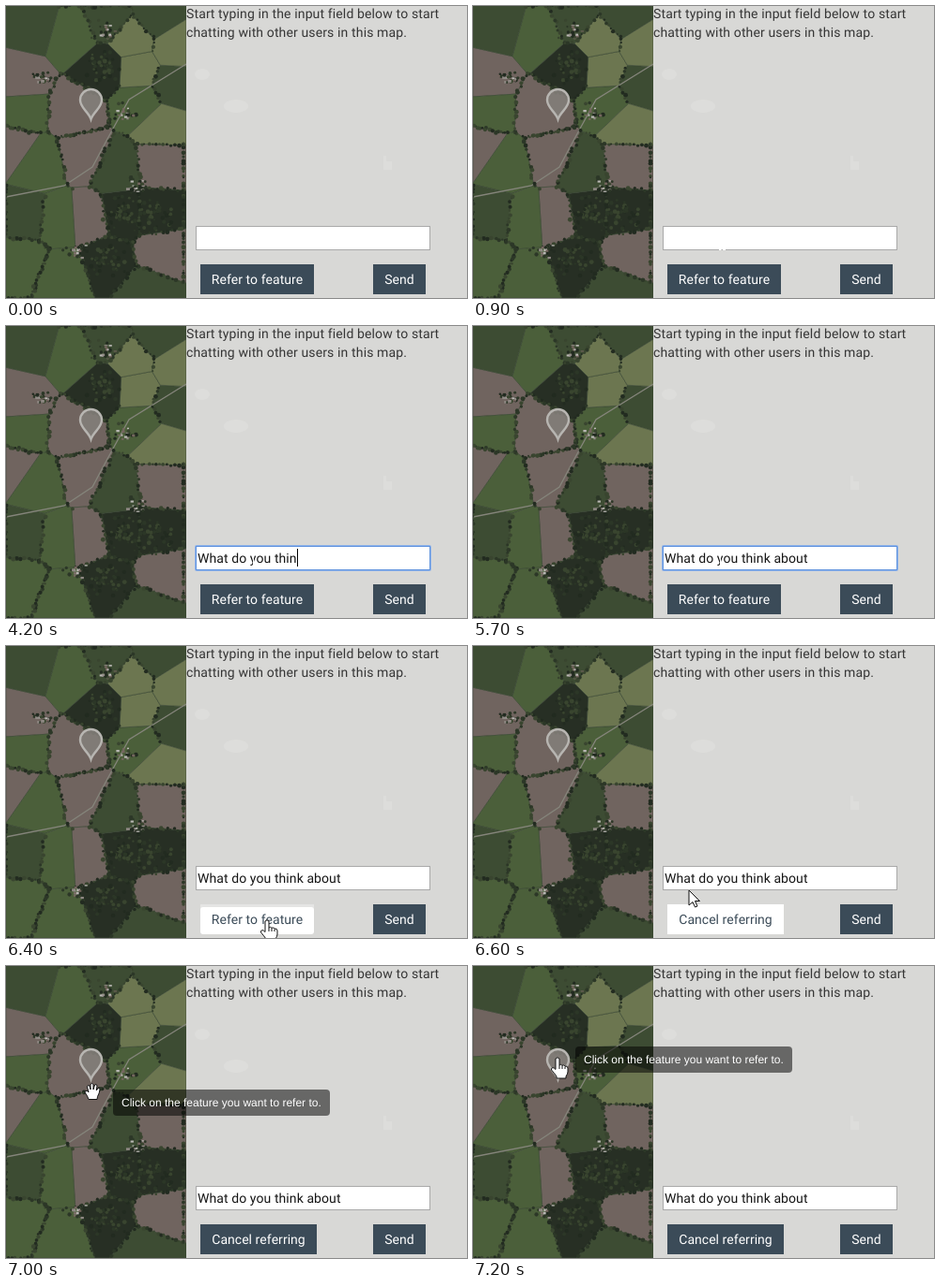
Animation, 491 px wide and 312 px high, one loop 8000 ms. Source, as an HTML page:

```html
<!DOCTYPE html>
<html lang="en">
<head>
<meta charset="utf-8">
<title>Map chat</title>
<style>
  html, body { margin: 0; width: 100%; height: 100%; overflow: hidden; background: #d8d8d6; }
  svg { display: block; width: 491px; height: 312px; }
  text { font: 14px Roboto, sans-serif; font-kerning: none; text-rendering: geometricPrecision; white-space: pre; }
  #intro text { fill: #363636; letter-spacing: .13px; }
  #typed { fill: #161616; letter-spacing: .08px; }
  .label { fill: #fff; text-anchor: middle; letter-spacing: .03px; }
  #tip text { font: 12px "Liberation Sans", Arial, sans-serif; fill: #fff; }
  #fields { stroke: #3a4632; stroke-opacity: .6; }
  #cursor path { fill: #fff; stroke: #111; stroke-linejoin: round; }
  #cursor #beam { fill: none; stroke: #fff; }
</style>
</head>
<body>
<svg viewBox="0 0 491 312">
  <g id="fields"></g>
  <path d="M192 62L131 100 108 142 92 172 62 192 0 204" fill="none" stroke="#85857b" stroke-width="1.3"/>
  <g id="specks"></g>
  <path d="M90.5 121C88 113 79 109 79 100.5A11.5 11.5 0 1 1 102 100.5C102 109 93 113 90.5 121Z" fill="#827d79" fill-opacity=".9" stroke="#b7b5b1" stroke-width="2.4"/>

  <rect x="192" width="299" height="312" fill="#d8d8d6"/>
  <g fill="#dddddb">
    <ellipse cx="245" cy="107" rx="13" ry="7"/>
    <ellipse cx="209" cy="73" rx="8" ry="6"/>
    <path d="M402 160h3v6h6v9h-9z"/>
  </g>
  <g id="intro">
    <text x="192" y="13">Start typing in the input field below to start</text>
    <text x="192" y="33">chatting with other users in this map.</text>
  </g>

  <rect id="glow" x="201.5" y="234.5" width="251" height="27" rx="1" fill="none" stroke="#8fb3ea"/>
  <rect id="box" x="202.5" y="235.5" width="249" height="25" fill="#fff"/>
  <text id="typed" x="204" y="253"></text>
  <rect id="caret" y="238" width="1" height="19"/>

  <rect id="strip" x="207" y="276" width="121" height="6" fill="#e5e5e4"/>
  <rect id="refer" x="207"/>
  <text id="referText" class="label" y="297"></text>
  <rect x="391" y="276" width="56" height="32" fill="#3b4b58"/>
  <text class="label" x="419" y="297">Send</text>

  <g id="tip">
    <rect width="231" height="28" rx="4" fill="#000" fill-opacity=".52"/>
    <text x="9" y="18">Click on the feature you want to refer to.</text>
  </g>
  <g id="cursor">
    <path id="arrow" d="M0 0V16L4 12.5 6.5 18 9 17 6.5 11.5H11.5Z"/>
    <path id="beam" d="M-3 -7.500H-.5M1 -7.500H4M.5 -7V6.500M-3 7.500H-.5M1 7.500H4"/>
    <path id="grab" d="M-4 8.5Q-5 5 -8 1 -8 -1.5 -5.5 -.5L-4 1 -5.5 -5Q-5 -7.5 -3 -6L-2 -2V-7.5Q-.5 -9.5 1 -7.5V-2L2.5 -7Q4.5 -8.5 5 -6L4.3 -1 6 -3.5Q8 -4.5 8 -2 7.5 2 5.5 5.5L5 8.5Z"/>
    <path id="hand" d="M-2 1Q0 -1.5 2 1V8Q3.500 6.500 5 8.300 7 7 8 9.200 10.500 8.200 11 11V15Q11 17 9 20V22H-1V20Q-3 17 -6.500 13 -7 11 -5 10.600 -3.500 10.800 -2 12.500ZM2 8V12M5 8.500V12M8 9.500V12"/>
  </g>
</svg>
<script>
const LOOP = 8000, STEP = 100;
const MAP_W = 192, MAP_H = 312;
const WHITE = [255, 255, 255], SLATE = [59, 75, 88];

const el = id => document.getElementById(id);
const set = (node, attrs) => { for (const k in attrs) node.setAttribute(k, attrs[k]); };
const show = (node, on) => node.setAttribute("visibility", on ? "visible" : "hidden");
const clamp = v => Math.max(0, Math.min(1, v));
const within = (t, a, b) => t >= a && t < b;
const mix = (a, b, k) => `rgb(${a.map((v, i) => Math.round(v + (b[i] - v) * k))})`;

let seed = 7;
const rnd = () => (seed = (seed * 16807) % 2147483647) / 2147483647;
const spread = r => (rnd() + rnd() - 1) * r;
const pick = list => list[Math.floor(rnd() * list.length)];
const points = text => text.split(" ").map(p => p.split(",").map(Number));

// Each field is the area nearest to its centre
const WOOD = "#272f24";
const land = {
  "#70645f": points("74,114 84,158 164,168 166,262 88,228 14,80 8,150"),
  "#4b5f3a": points("34,168 56,230 16,272 60,288 72,30 142,104 16,112"),
  "#3d4c33": points("28,18 108,14 160,12 178,84 118,174 20,226 150,306"),
  "#6c7650": points("140,68 165,128 134,36 180,44"),
  [WOOD]: points("124,222 160,222 108,272 104,66")
};
const villages = points("36,76 104,26 138,191 76,262 125,114");

// Keep the part of a polygon nearer to a than to b
function clip(poly, a, b) {
  const side = p => Math.hypot(p[0] - b[0], p[1] - b[1]) ** 2 - Math.hypot(p[0] - a[0], p[1] - a[1]) ** 2;
  return poly.flatMap((p, i) => {
    const q = poly[(i + 1) % poly.length];
    const [sp, sq] = [side(p), side(q)];
    const cut = sp / (sp - sq);
    const kept = sp >= 0 ? [p] : [];
    return sp * sq < 0 ? [...kept, p.map((v, n) => v + (q[n] - v) * cut)] : kept;
  });
}

function tree(x, y) {
  const fill = pick(["#222b20", "#2c3727", "#39452f"]);
  return `<circle cx="${Math.min(x, MAP_W - 3)}" cy="${y}" r="${1 + rnd() * 1.5}" fill="${fill}"/>`;
}

function roof(x, y) {
  const fill = pick(["#b9b7b3", "#8f8984", "#75665f"]);
  return `<rect x="${x}" y="${y}" width="${2 + rnd() * 2}" height="${1 + rnd() * 2}" fill="${fill}"/>`;
}

function drawMap() {
  const sites = Object.values(land).flat();
  const frame = [[0, 0], [MAP_W, 0], [MAP_W, MAP_H], [0, MAP_H]];
  let fields = "", specks = "";
  for (const [color, centres] of Object.entries(land)) for (const c of centres) {
    const cell = sites.reduce((poly, s) => s === c ? poly : clip(poly, c, s), frame);
    fields += `<polygon points="${cell.join(" ")}" fill="${color}"/>`;
    cell.forEach((p, i) => {
      const q = cell[(i + 1) % cell.length];
      const length = Math.hypot(q[0] - p[0], q[1] - p[1]);
      if (rnd() < .4) for (let d = 0; d < length; d += 4) {
        const k = d / length;
        specks += tree(p[0] + (q[0] - p[0]) * k + spread(2), p[1] + (q[1] - p[1]) * k + spread(2));
      }
    });
    if (color === WOOD) for (let i = 0; i < 45; i++) specks += tree(c[0] + spread(22), c[1] + spread(20));
  }
  for (const [x, y] of villages) for (let i = 0; i < 12; i++) {
    specks += tree(x + spread(16), y + spread(12)) + roof(x + spread(12), y + spread(8));
  }
  el("fields").innerHTML = fields;
  el("specks").innerHTML = specks;
}

// Bursts of typing: first and last step, text
const bursts = [[2400, 2400, "W"], [2600, 2800, "hat "], [3000, 3500, "do you "], [3800, 3900, "thi"],
  [4200, 4300, "nk "], [4500, 4600, "ab"], [4900, 5200, "out "]];

function typedAt(t) {
  return bursts.map(([from, to, text]) =>
    text.slice(0, Math.floor(text.length * clamp((t - from + STEP) / (to - from + STEP))))).join("");
}

// Moves: start, end, destination
const pointerMoves = [[200, 900, 265, 253], [1600, 1700, 263, 250], [5900, 6400, 278, 293],
  [6500, 6800, 93, 170], [6800, 7200, 90, 98]];
const tipMoves = [[6800, 7200, 109, 86]];

function follow(moves, t, start) {
  return moves.reduce((pos, [from, to, ...dest]) => {
    const p = clamp((t - from) / (to - from));
    const eased = p * p * (3 - 2 * p);
    return pos.map((v, i) => Math.round(v + (dest[i] - v) * eased));
  }, start);
}

function cursorKind(x, y) {
  if (x < MAP_W) return Math.hypot(x - 90, y - 101) < 14 ? "hand" : "grab";
  if (within(x, 202, 452) && within(y, 235, 261)) return "beam";
  if (within(x, 207, 328) && within(y, 276, 308)) return "hand";
  return "arrow";
}

function drawInput(t) {
  const focus = within(t, 1500, 6400);
  const text = typedAt(t);
  show(el("glow"), focus);
  set(el("box"), { stroke: focus ? "#5f92dd" : "#a9a9a9" });
  el("typed").textContent = text;
  show(el("caret"), within(t, 1500, 2000) || within(t, 2400, 5700) || within(t, 6200, 6400));
  set(el("caret"), { x: Math.round(204 + (text ? el("typed").getComputedTextLength() : 0)) });
}

function drawButton(t) {
  const cancel = t >= 6500;
  const glow = cancel ? clamp((7000 - t) / 400) : clamp((t - 6100) / 300);
  const lift = cancel ? 0 : 3 * glow;
  const width = cancel ? 124 : 121;
  show(el("strip"), lift > 0);
  set(el("refer"), { y: 276 + lift, width, height: 32 - lift, rx: lift, fill: mix(SLATE, WHITE, glow) });
  set(el("referText"), { x: 207 + width / 2, style: `fill:${mix(WHITE, SLATE, glow ** 3)}` });
  el("referText").textContent = cancel ? "Cancel referring" : "Refer to feature";
}

function drawPointer(t) {
  const [x, y] = follow(pointerMoves, t, [45, 13]);
  const kind = cursorKind(x, y);
  for (const shape of el("cursor").children) show(shape, t >= 200 && shape.id === kind);
  set(el("cursor"), { transform: `translate(${x} ${y})` });
  show(el("tip"), t >= 6800);
  set(el("tip"), { transform: `translate(${follow(tipMoves, t, [118, 178])})` });
}

const start = performance.now();
let last = -1;

function tick(now) {
  const elapsed = Math.max(0, now - start) % LOOP;
  const t = Math.floor(elapsed / STEP) * STEP;
  if (t !== last) {
    last = t;
    drawInput(t);
    drawButton(t);
    drawPointer(t);
  }
  requestAnimationFrame(tick);
}

drawMap();
tick(start);
</script>
</body>
</html>
```
